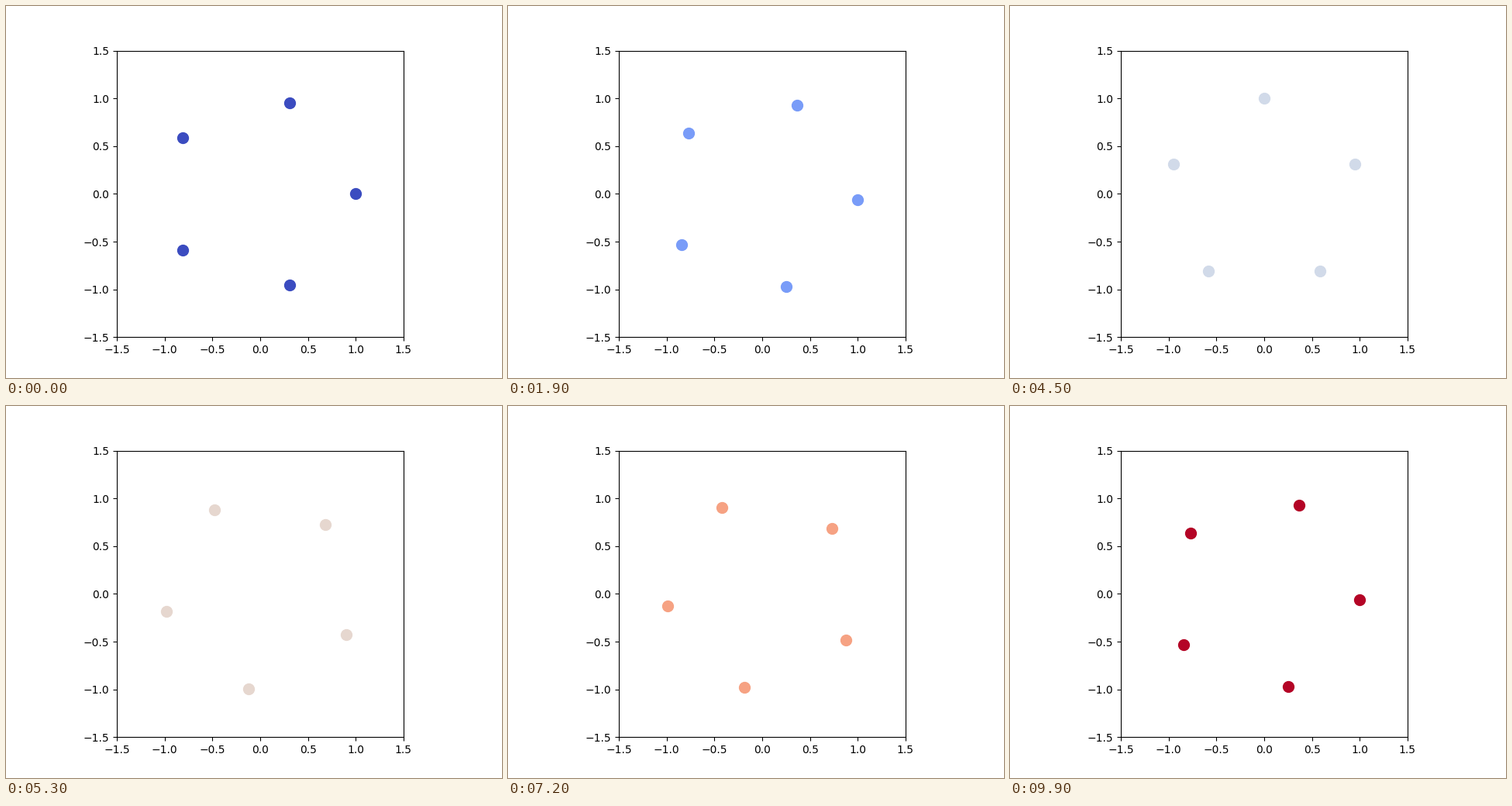
A matplotlib script that plays this animation: 640x480 px, repeating every 10 s.

```python
import matplotlib.pyplot as plt
import numpy as np
from matplotlib.animation import FuncAnimation

FRAMES = 100
DOTS = 5

fig, ax = plt.subplots(figsize=(6.4, 4.8), dpi=100)
ax.set_aspect("equal")
ax.set_xlim(-1.5, 1.5)
ax.set_ylim(-1.5, 1.5)
ticks = np.arange(-1.5, 1.6, 0.5)
ax.set_xticks(ticks)
ax.set_yticks(ticks)

base = 2 * np.pi * np.arange(DOTS) / DOTS
colors = plt.cm.coolwarm(np.linspace(0, 1, FRAMES))
dots, = ax.plot([], [], "o", markersize=10)


def update(i):
    """Turn the pentagon of dots and warm its colour."""
    angle = base + 2 * np.pi * i / FRAMES
    dots.set_data(np.cos(angle), np.sin(angle))
    dots.set_color(colors[i])
    return dots,


anim = FuncAnimation(fig, update, frames=FRAMES, interval=100, repeat=True)
plt.show()
```
